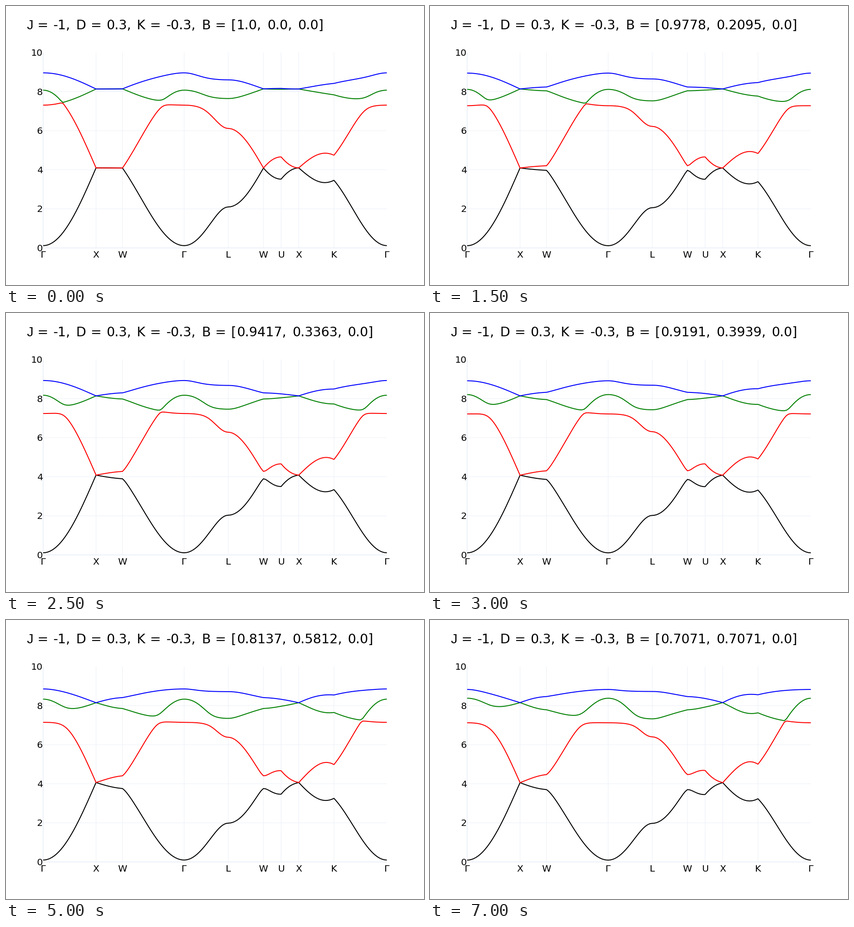
Recreate the animation shown at these times as a matplotlib script. Size 917 by 611 pixels, loop 7.5 s.

```python
"""Spin-wave bands of a pyrochlore ferromagnet while the field turns from [100] to [110]."""
import numpy as np
import matplotlib.pyplot as plt
from matplotlib.animation import FuncAnimation

W, H, DPI = 917, 611, 100
STEPS = 15
SCALE = W / 900
LEFT, RIGHT, TOP, BOTTOM = (v * SCALE for v in (80, 820, 100, 520))

J, D, K, ZEEMAN = -1.0, 0.3, -0.3, 0.1

# Four sites of a tetrahedron, with local axes pointing to its centre.
SITES = np.array([[1, 1, 1], [-1, -1, 1], [1, -1, -1], [-1, 1, -1]]) / 8
AXES = SITES / np.linalg.norm(SITES, axis=1, keepdims=True)

NODES = {"Γ": (0, 0, 0), "X": (1, 0, 0), "W": (1, .5, 0), "L": (.5, .5, .5),
         "U": (1, .25, .25), "K": (.75, .75, 0)}
PATH = "ΓXWΓLWUXKΓ"
PER_UNIT = 4


def unit(v):
    return v / np.linalg.norm(v, axis=-1, keepdims=True)


def couplings():
    """Exchange, antisymmetric exchange and easy-axis terms for each site pair."""
    c = np.zeros((4, 4, 3, 3))
    for i in range(4):
        for j in range(4):
            if i == j:
                c[i, i] = 2 * K * np.outer(AXES[i], AXES[i])
            else:
                dm = -D * unit(np.cross(SITES[i], SITES[j]))
                c[i, j] = 2 * (J * np.eye(3) + np.cross(dm, np.eye(3)))
    return c


def k_path():
    """Wave vectors, their positions on the axis and the node positions."""
    ks, xs, ticks = [], [], [0]
    for a, b in zip(PATH, PATH[1:]):
        a, b = np.array(NODES[a]), np.array(NODES[b])
        size = int(2 * np.pi * np.linalg.norm(b - a))
        t = np.linspace(0, 1, size * PER_UNIT + 1)
        ks.append(a + np.outer(t, b - a))
        xs.append(ticks[-1] + t * size)
        ticks.append(ticks[-1] + size)
    return np.vstack(ks), np.concatenate(xs), np.array(ticks)


def ground_state(c, field):
    spins = np.repeat(unit(field)[None], 4, axis=0)
    flat = c.transpose(0, 2, 1, 3).reshape(12, 12)
    for _ in range(1200):
        spins = unit(field - (flat @ spins.ravel()).reshape(4, 3))
    return spins


def bands(c, field, ks):
    """Linear spin-wave energies, sorted upwards for each wave vector."""
    z = ground_state(c, field)
    e1 = unit(np.cross(z, [0, 0, 1]))
    u = e1 + 1j * np.cross(z, e1)
    normal = np.einsum("ia,ijab,jb->ij", u, c, u.conj()) / 2
    pair = np.einsum("ia,ijab,jb->ij", u, c, u) / 2
    local = z @ field - np.einsum("ia,ijab,jb->i", z, c, z)
    gaps = SITES[None] - SITES[:, None]
    phase = np.cos(2 * np.pi * np.einsum("ka,ija->kij", ks, gaps))
    p = normal * phase + np.diag(local)
    q = pair * phase
    m = np.block([[p, q], [-q.conj(), -p.conj()]])
    return np.sort(np.linalg.eigvals(m).real, axis=1)[:, 4:]


ks, path_x, ticks = k_path()
to_x = lambda v: LEFT + v * (RIGHT - LEFT) / ticks[-1]
to_y = lambda e: BOTTOM - e * (BOTTOM - TOP) / 10

directions = [unit(np.array([1, i / (STEPS - 1), 0])) for i in range(STEPS)]
pair_terms = couplings()
energies = [bands(pair_terms, ZEEMAN * b, ks) for b in directions]

fig = plt.figure(figsize=(W / DPI, H / DPI), dpi=DPI, facecolor="white")
ax = fig.add_axes([0, 0, 1, 1])
ax.set_xlim(0, W)
ax.set_ylim(H, 0)
ax.axis("off")

PX = 72 / DPI
GRID = "#ebf0f8"
EM = 28 * SCALE


def rule(xs, ys, width):
    ax.plot(xs, ys, color=GRID, lw=width * SCALE * PX, solid_capstyle="butt",
            snap=False, zorder=1)


def label(x, y, s, size=20 * SCALE, ha="left", family="DejaVu Sans"):
    return ax.text(x, y, s, fontsize=size * PX, ha=ha, va="baseline",
                   family=family, color="black", zorder=3)


def title_x(offset):
    return 45 * SCALE + offset * EM


def title_word(offset, s, **kw):
    return label(title_x(offset), 51.2, s, size=EM, **kw)


for name, t in zip(PATH, ticks):
    if t < ticks[-1]:
        rule([to_x(t)] * 2, [TOP, BOTTOM], 1 if t else 2)
    label(to_x(t), 550.6, name, ha="center")
for e in range(0, 11, 2):
    if e < 10:
        rule([LEFT, RIGHT], [to_y(e)] * 2, 1 if e else 2)
    label(80.5, to_y(e) + 7.2, str(e), ha="right")

title_word(0, "J", family="Liberation Sans")
for offset, word in [(.8, "="), (2.04, "-1,"), (3.77, "D"), (4.9, "="),
                     (6.1, "0.3,"), (8.42, "K"), (9.465, "="), (10.72, "-0.3,"),
                     (13.44, "B"), (14.48, "="), (15.69, "[")]:
    title_word(offset, word)
NUMBERS = 16.14
parts = [title_word(NUMBERS, "") for _ in range(3)]

lines = [ax.plot([], [], color=col, lw=2 * SCALE * PX, solid_joinstyle="round",
                 solid_capstyle="butt", zorder=4)[0]
         for col in ("black", "red", "green", "blue")]


def draw(i):
    for n, line in enumerate(lines):
        line.set_data(to_x(path_x), to_y(energies[i][:, n]))
    offset = NUMBERS
    for part, value, end in zip(parts, directions[i], ",,]"):
        number = str(round(float(value), 4))
        part.set_text(number + end)
        part.set_x(title_x(offset))
        offset += .636 * (len(number) - 1) + 1.08
    return lines + parts


anim = FuncAnimation(fig, draw, frames=STEPS, interval=500, repeat=True, repeat_delay=0)
plt.show()
```
